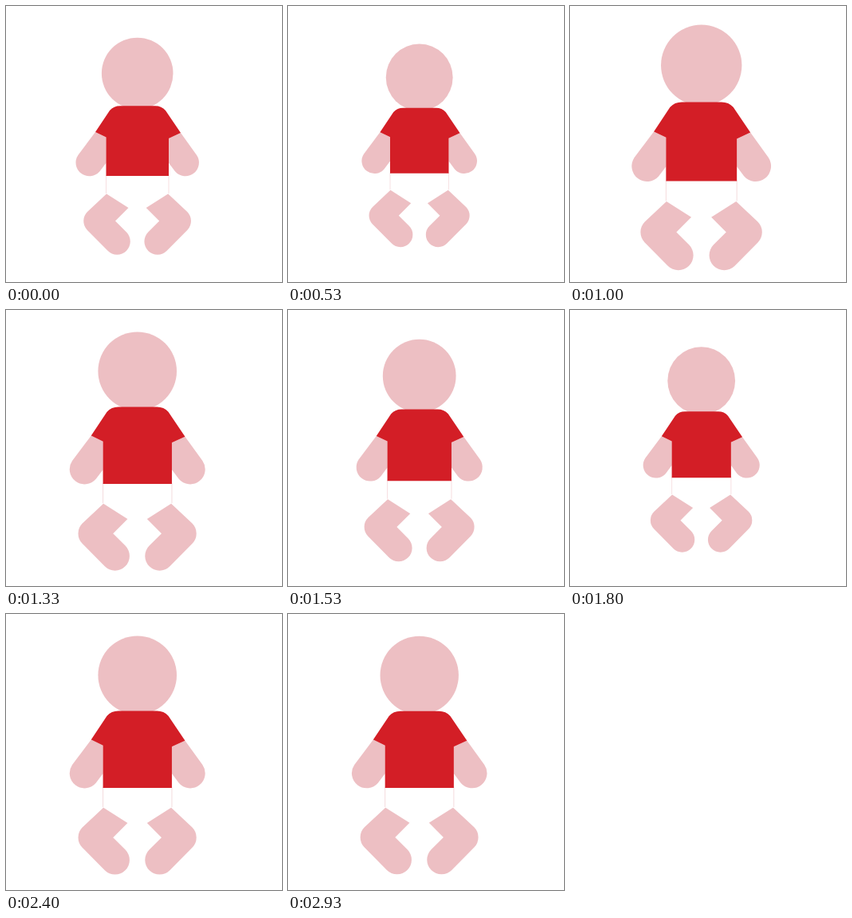
Animation, 346 px wide and 346 px high, one loop 2.99 s. Source, as an HTML page:

```html
<!DOCTYPE html>
<html lang="en">
<head>
<meta charset="utf-8">
<title>Pulsing baby</title>
<style>
  html, body { margin: 0; height: 100%; overflow: hidden; background: #fff; }
  svg { display: block; width: 100%; height: 100%; }
</style>
</head>
<body>
<svg viewBox="0 0 346 346">
  <g id="baby" fill="#edbfc3">
    <circle cx="164.7" cy="84.5" r="44.8"/>
    <path d="M112 158 L90.5 186.7 A17 17 0 0 0 117.5 207.3 L125.5 196.7 V164.5Z"/>
    <path d="M219 159 L238.9 186.7 A17 17 0 0 1 211.9 207.3 L204 196.7 V166Z"/>
    <path id="leg" d="M126 235.5 L102 258 A16.3 16.3 0 0 0 101.7 280.7 L127.5 306.8 A16.5 16.5 0 0 0 151 283.5 L137 269.5 L153.5 253Z"/>
    <use href="#leg" transform="translate(329.2) scale(-1 1)"/>
    <path d="M125.5 212 V235 M204 212 V235" stroke="#edbfc3" stroke-width=".5"/>
    <path fill="#d31e26" d="M112 158 L130 131 Q135 125.3 143 125.3 H187 Q195 125.3 200 131 L219 159 L204 166 V213 H125.5 V164.5Z"/>
  </g>
</svg>
<script>
  const LOOP = 2990, FPS = 15, BEAT = 23.9;
  const CX = 164.6, CY = 162.5;

  // One beat: [tick, scale]
  const keys = [
    [0, 1], [3.1, .946], [5.7, .922], [8, .936], [12.1, 1.1],
    [15, 1.131], [17.2, 1.15], [20.1, 1.098], [23, 1.024]
  ];

  // Key by index, continued periodically in both directions
  function key(i) {
    const n = keys.length, turn = Math.floor(i / n);
    const [x, y] = keys[i - turn * n];
    return [x + turn * BEAT, y];
  }

  function slope(i) {
    const [x0, y0] = key(i - 1), [x1, y1] = key(i + 1);
    return (y1 - y0) / (x1 - x0);
  }

  // Smooth cubic through the keys
  function scaleAt(tick) {
    const x = tick % BEAT;
    let i = keys.length - 1;
    while (keys[i][0] > x) i--;
    const [x0, y0] = key(i), [x1, y1] = key(i + 1);
    const w = x1 - x0, u = (x - x0) / w, v = 1 - u;
    return y0 * v * v * (1 + 2 * u) + y1 * u * u * (1 + 2 * v)
      + w * u * v * (slope(i) * v - slope(i + 1) * u);
  }

  const baby = document.getElementById("baby");
  const start = performance.now();

  function draw() {
    const t = (performance.now() - start) % LOOP;
    const tick = Math.floor((t + 5) * FPS / 1000);
    const s = scaleAt(tick);
    baby.setAttribute("transform",
      `translate(${CX} ${CY}) scale(${s}) translate(${-CX} ${-CY})`);
    requestAnimationFrame(draw);
  }
  draw();
</script>
</body>
</html>
```
